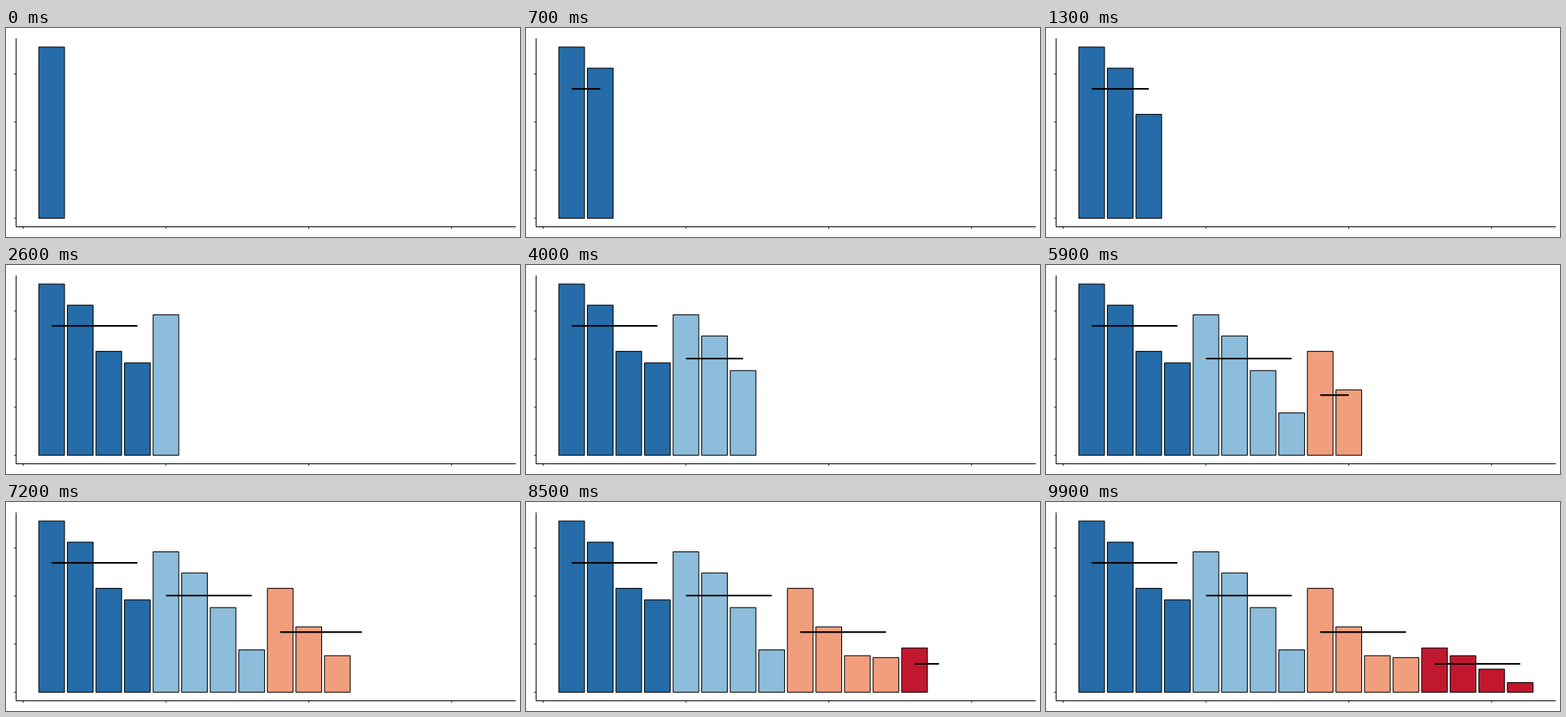
A matplotlib script that plays this animation: 675 px wide and 275 px high, repeating every 10000 ms.

```python
import numpy as np
import matplotlib.pyplot as plt
from matplotlib.animation import FuncAnimation
from matplotlib.patches import Rectangle

W, H, DPI = 675, 275, 100
FRAMES, INTERVAL = 100, 100
PX = 72 / DPI                      # points per pixel

VALUES = [89, 78, 54, 48, 73, 62, 44, 22, 54, 34, 19, 18, 23, 19, 12, 5]
COLORS = ["#256ca8", "#8dbdda", "#f19e7c", "#c2182f"]
GROUP = 4
BAR_WIDTH = 0.9
THIN, THICK = 1.07 * PX, 2.13 * PX
TICK = 2.75

# frame at which each bar is revealed
KEYS = np.rint(np.arange(len(VALUES)) * (FRAMES - 1) / (len(VALUES) - 1))


def px(x):
    return 22.44 + 37.52 * x


def py(y):
    return 250.3 - 2.531 * y


fig = plt.figure(figsize=(W / DPI, H / DPI), dpi=DPI, facecolor="white")
ax = fig.add_axes([0, 0, 1, 1])
ax.set_xlim(0, W)
ax.set_ylim(H, 0)
ax.axis("off")


def segment(x, y, width, color="black", z=3):
    line, = ax.plot(x, y, color=color, lw=width, zorder=z, snap=False,
                    solid_capstyle="butt")
    return line


# axes with 5 % padding around the data
left, right = px(-0.245), px(17.245)
top, bottom = py(93.45), py(-4.45)
for x in (0, 5, 10, 15):
    segment([px(x)] * 2, [bottom, bottom + TICK], THIN, "#333333", 1)
for y in (0, 25, 50, 75):
    segment([left - TICK, left], [py(y)] * 2, THIN, "#333333", 1)
segment([left, left], [top, bottom], THIN)
segment([left, right], [bottom, bottom], THIN)

bars = []
for i, value in enumerate(VALUES):
    bar = Rectangle((px(i + 1 - BAR_WIDTH / 2), py(value)),
                    px(BAR_WIDTH) - px(0), py(0) - py(value),
                    fc=COLORS[i // GROUP], ec="black", lw=THIN,
                    joinstyle="miter", zorder=2, snap=False)
    bars.append(ax.add_patch(bar))

means = [segment([], [], THICK, z=4) for _ in COLORS]


def update(frame):
    for bar, key in zip(bars, KEYS):
        bar.set_visible(frame >= key)
    head = np.interp(frame, KEYS, np.arange(1, len(VALUES) + 1))
    for g, line in enumerate(means):
        first = g * GROUP + 1
        end = min(head, first + GROUP - 1)
        if end > first:
            level = py(np.mean(VALUES[first - 1:first - 1 + GROUP]))
            line.set_data([px(first), px(end)], [level, level])
        else:
            line.set_data([], [])
    return bars + means


anim = FuncAnimation(fig, update, frames=FRAMES, interval=INTERVAL,
                     init_func=lambda: update(0), repeat=True,
                     repeat_delay=0)
plt.show()
```
